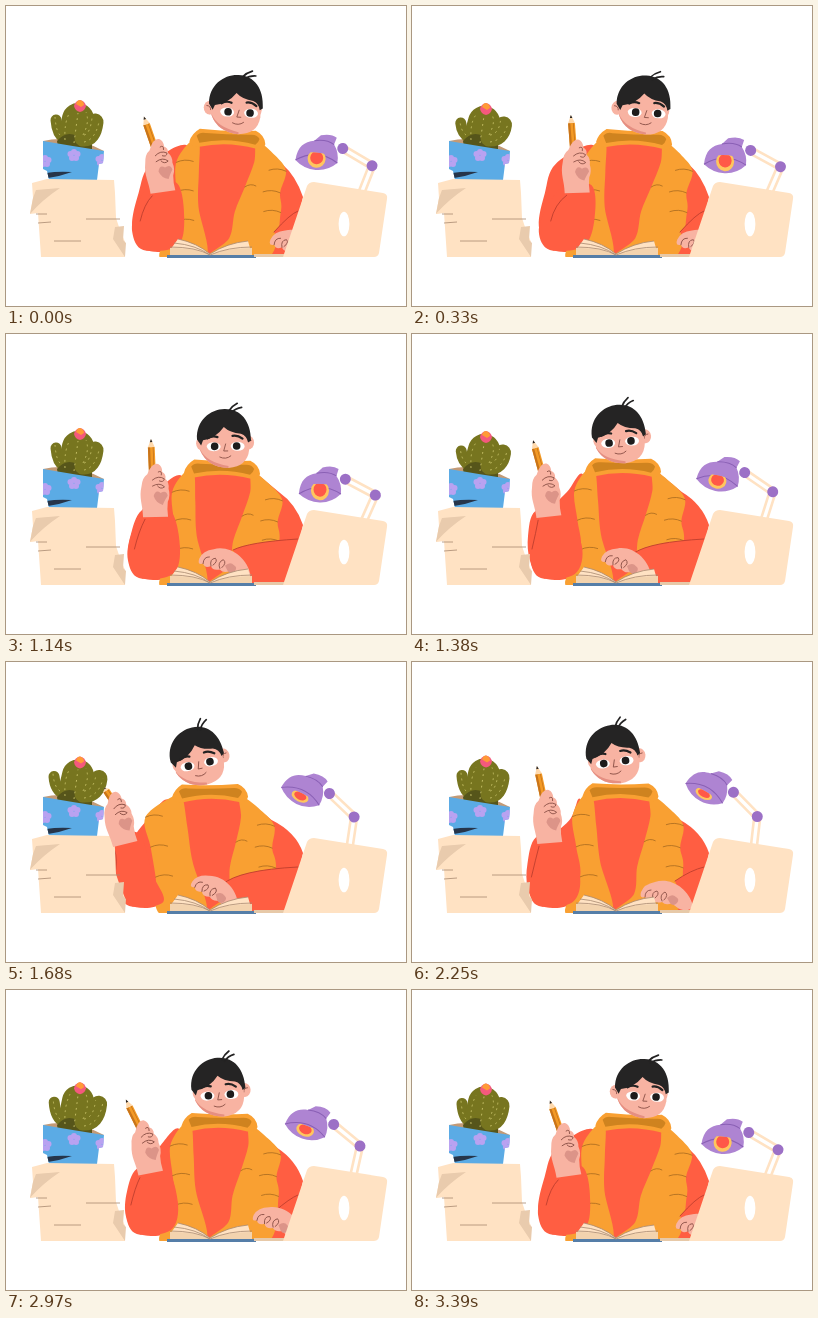
Recreate the animation shown at these times as an HTML page. Size 400 by 300 pixels, loop 3420 ms.

```html
<!DOCTYPE html>
<html lang="en">
<head>
<meta charset="utf-8">
<title>Student at a desk</title>
<style>
html, body { margin: 0; width: 100%; height: 100%; overflow: hidden; background: #fff; }
svg { display: block; width: 100vw; height: 100vh; }
.skin { fill: #f8b3a2; }
.palm { fill: #dc9488; }
.line { fill: none; stroke: #8d5248; stroke-width: .9; stroke-linecap: round; }
.ink { fill: none; stroke: #232222; stroke-linecap: round; }
.red { fill: #ff5e42; }
.vest { fill: #f9a032; }
.crease { fill: none; stroke: #a86a20; stroke-width: .8; stroke-linecap: round; }
.fold { fill: none; stroke: #bf3f2e; stroke-width: .9; stroke-linecap: round; }
.paper { fill: #ffe2c3; }
.shade { fill: #e9cbad; }
.edge { fill: none; stroke: #a98a70; stroke-width: .8; }
.rod { fill: none; stroke: #ffe2c3; stroke-width: 2.6; }
.rim { fill: none; stroke: #8a60b5; }
.stem { fill: none; stroke: #77751f; stroke-linecap: round; }
.spines { fill: none; stroke: #c9c36a; stroke-width: .9; stroke-dasharray: 1.8 4; }
</style>
</head>
<body>
<svg viewBox="0 0 400 300">
  <defs>
    <clipPath id="desk"><path d="M0 0H400V251H0Z"/></clipPath>
    <clipPath id="bulbClip"><path d="M-20 -2Q0 -8 20 -2V14H-20Z"/></clipPath>
    <clipPath id="potClip"><path d="M37 135Q66 140 98 145L97 157L93 158L91 174H43L41 165L37 163Z"/></clipPath>
    <g id="petal">
      <circle cx="-3.5" r="3"/><circle cx="3.5" r="3"/>
      <circle cx="-2" cy="4" r="3"/><circle cx="2" cy="4" r="3"/><circle cy="-2" r="3"/>
    </g>
    <circle id="joint" r="5.5" fill="#9c70c6"/>
  </defs>

  <path d="M37 135Q66 128 98 145Q70 146 37 137Z" fill="#c39a76"/>
  <path id="stemL" class="stem" stroke-width="11"/>
  <path id="stem" class="stem" stroke-width="32"/>
  <path d="M51 135Q60 124 71 130T86 130L86 145L52 141Z" fill="#56551a"/>
  <path id="stemR" class="stem" stroke-width="17"/>
  <path id="spines" class="spines"/>
  <g id="flower">
    <path d="M-6 0Q-5 -5 0 -6Q5 -5 6 0Q5 5 0 6Q-5 5 -6 0Z" fill="#f4597d"/>
    <path d="M-4 -2Q-3 -6 0 -6Q4 -5 4 -1L1 1Z" fill="#ff9a37"/>
  </g>
  <g clip-path="url(#potClip)">
    <path d="M30 130H100V178H30Z" fill="#5babe5"/>
    <path d="M40 167Q52 165 66 166Q55 170 42 172Z" fill="#26354a"/>
    <g fill="#b9a2f1">
      <use href="#petal" x="39" y="154"/><use href="#petal" x="68" y="148"/><use href="#petal" x="96" y="153"/>
    </g>
  </g>

  <g id="lowerRod">
    <path class="rod" d="M-3 0V-82M3 0V-82"/>
    <g id="upperRod">
      <path class="rod" d="M0 -3H-34M0 3H-34"/>
      <use href="#joint"/>
      <g id="lampHead">
        <g transform="translate(-25 10)">
          <path fill="#ae84d2" d="M-21 6C-20 -8 -14 -13 -4 -15L2 -21Q12 -24 18 -20L16 -13Q22 -5 21 5Q12 14 0 14Q-12 14 -21 6Z"/>
          <path class="rim" d="M-4 -15Q8 -18 16 -13M-21 6Q0 -8 21 5"/>
          <g id="bulb" clip-path="url(#bulbClip)">
            <circle cy="2" r="10" fill="#ffc65e"/><circle cy="1" r="7.2" fill="#ff5848"/>
          </g>
        </g>
        <use href="#joint"/>
      </g>
    </g>
  </g>

  <g clip-path="url(#desk)">
    <path id="torso" class="red"/>
    <path id="sleeve" class="red"/>
    <path id="panelL" class="vest"/>
    <path id="panelR" class="vest"/>
    <path id="creases" class="crease"/>
    <g id="collar">
      <path class="vest" d="M-38 5Q-36 -3 -28 -8Q0 -6 28 -8Q37 -4 38 5Q36 12 29 10Q0 3 -28 10Q-36 11 -38 5Z"/>
      <path d="M-31 -1Q-28 -5 -22 -4Q0 -3 24 -4Q30 -4 32 0Q31 4 28 6Q0 -1 -28 6Z" fill="#cf831f"/>
    </g>
  </g>

  <g id="face">
    <g id="earL"><ellipse class="skin" rx="6" ry="7"/><path class="line" d="M-3 -2Q1 -2 1 2"/></g>
    <g id="earR"><ellipse class="skin" rx="6" ry="7"/><path class="line" d="M3 -2Q-1 -2 -1 2"/></g>
    <path class="skin" d="M-24 -8L0 -20L25 -8V12Q23 29 4 30Q-17 29 -24 12Z"/>
    <path d="M-24 11Q-18 24 4 28V30Q-17 29 -24 12Z" fill="#e58f82"/>
    <path fill="#252424" d="M-27 1C-28 -18 -13 -29 1 -29C17 -29 27 -17 27 3L24 5Q23 -2 17 -4Q6 -5 0 -11Q-8 0 -21 2L-23 7Z"/>
    <path id="strand" class="ink" stroke-width="1.7" d="M-2 3Q-3 -2 -1 -8M1 3Q1 -3 5 -8"/>
    <g id="features">
      <path class="ink" stroke-width="2.2" d="M-17 0Q-12 -3 -7 -1M8 -2Q13 -3 18 1"/>
      <g id="open">
        <path fill="#fff" d="M-18 8Q-17 4 -10 4Q-4 5 -4 9Q-5 13 -11 13Q-17 13 -18 8M6 8Q7 4 14 4Q20 5 20 9Q19 13 13 13Q7 13 6 8"/>
        <g fill="#1d1c1c"><circle cx="-10" cy="8.2" r="3.8"/><circle cx="12" cy="8.2" r="3.8"/></g>
      </g>
      <g id="shut">
        <path fill="#ffd0c3" d="M-18 7Q-11 3 -4 7Q-11 12 -18 7M6 7Q13 3 20 7Q13 12 6 7"/>
        <path class="line" d="M-18 8Q-11 10 -4 8M6 8Q13 10 20 8"/>
      </g>
      <path class="line" d="M1 6L-1 13H3M-5 19Q1 22 6 18"/>
    </g>
  </g>

  <path id="forearmL" class="red"/>
  <path id="foldL" class="fold"/>
  <path class="paper" d="M26 177L41 173L108 174L109 187L110 212L113 221L119 236V251H35L32 207L24 208L27 192Z"/>
  <path class="shade" d="M30 184L54 182Q36 194 24 208L27 192ZM109 221L118 220L117 234L120 237L119 251L107 233Z"/>
  <path class="edge" d="M30 208H41M32 217L45 216M80 213H114M48 235H75"/>

  <g id="handL">
    <g id="pencil">
      <path d="M-3.4 -22H3.4V6H-3.4Z" fill="#f39a25"/>
      <path d="M-3.4 -22H-1.2V6H-3.4ZM1.4 -22H2.2V6H1.4Z" fill="#c8741a"/>
      <path d="M0 -30L3.4 -22H-3.4Z" fill="#ffd9ac"/><path d="M0 -30L1.3 -27H-1.3Z" fill="#292523"/>
    </g>
    <path class="skin" d="M-13 3C-13 -10 -17 -16 -14 -28Q-13 -37 -8 -40Q-3 -52 3 -50Q7 -48 7 -42Q11 -40 10 -35Q14 -31 13 -25Q15 -18 12 -12Q11 -5 12 3Z"/>
    <path class="palm" d="M-2 -18Q0 -25 5 -21Q11 -24 12 -18Q8 -12 7 -9Q0 -11 -2 -18Z"/>
    <path class="line" d="M-3 -34Q3 -39 9 -35Q8 -31 4 -33M-3 -28Q4 -32 9 -27Q5 -24 2 -28M3 -42Q7 -44 6 -39"/>
  </g>

  <g clip-path="url(#desk)">
    <path id="forearmR" class="red"/>
    <path id="foldR" class="fold"/>
    <g id="handR">
      <path class="skin" d="M2 9C-2 -8 -20 -20 -36 -15Q-47 -13 -50 -5Q-52 2 -46 0Q-44 5 -38 2Q-36 7 -29 5Q-25 9 -19 6C-12 14 -2 16 2 9Z"/>
      <path class="palm" d="M-24 1Q-19 -4 -15 0Q-11 2 -14 6Q-18 10 -21 6Z"/>
      <path class="line" d="M-46 0Q-46 -7 -40 -7M-38 2Q-40 -5 -34 -6Q-31 -3 -36 1M-29 4Q-32 -2 -26 -5Q-22 -2 -27 3"/>
    </g>
  </g>

  <path d="M161 249H250V252H161Z" fill="#557ea8"/>
  <path class="paper" d="M164 244L172 233Q191 237 204 248Q221 237 242 235L246 249H164Z"/>
  <path d="M164 242Q188 241 204 249Q220 242 246 242V249H164Z" fill="#f3d3ae"/>
  <path class="edge" d="M172 233Q191 237 204 248Q221 237 242 235M164 241Q190 241 204 249Q222 241 246 241M168 237Q190 239 204 249"/>
  <path d="M248 248H281V251H248Z" fill="#e7c9a8"/>
  <path class="paper" d="M277 251L301 180Q303 176 308 176L377 187Q382 188 381 193L373 247Q372 251 368 251Z"/>
  <ellipse cx="338" cy="218" rx="5.4" ry="12.3" fill="#fff"/>
</svg>
<script>
const LOOP = 3420, STEP = 30;

// Key poses; everything else on the body and lamp follows from these.
// face and hands: x, y, rotation; lamp: angle of the lower rod
const poses = [
  { t: 0,    face: [230, 98, 3],    left: [157, 183, -8],  right: [314, 242, 4],  lamp: [21.5] },
  { t: 750,  face: [234, 99, 4],    left: [178, 185, 7],   right: [316, 242, 4],  lamp: [26] },
  { t: 1140, face: [218, 104, -1],  left: [150, 180, -1],  right: [243, 232, 3],  lamp: [24] },
  { t: 1680, face: [191, 94, -12],  left: [119, 179, -14], right: [233, 238, 16], lamp: [8.5] },
  { t: 2250, face: [201, 92, -8],   left: [138, 178, -5],  right: [279, 235, 0],  lamp: [6.5] },
  { t: 2640, face: [200, 96, -9],   left: [136, 178, -13], right: [284, 235, 13], lamp: [6.5] }
];
poses.push({ ...poses[0], t: 3390 });

// Vest outlines of the upright pose, each starting at its inner top.
const vestL = [[180, 134], [184, 165], [188, 200], [200, 252], [154, 252], [168, 215], [164, 185], [160, 155], [171, 134]];
const vestR = [[238, 134], [258, 148], [271, 164], [268, 186], [271, 206], [262, 252], [203, 252], [222, 232], [225, 205], [232, 180], [238, 155]];

const el = id => document.getElementById(id);
const set = (id, name, value) => el(id).setAttribute(name, value);
const path = (id, d) => set(id, "d", d);
const place = (id, x, y, r = 0, sx = 1, sy = sx) =>
  set(id, "transform", `translate(${x} ${y}) rotate(${r}) scale(${sx} ${sy})`);
const clamp = (v, lo, hi) => Math.max(lo, Math.min(hi, v));

function poseAt(t) {
  const i = Math.max(1, poses.findIndex(p => p.t > t));
  const [a, b] = t >= LOOP - STEP ? [poses[0], poses[0]] : [poses[i - 1], poses[i]];
  const u = b.t > a.t ? (t - a.t) / (b.t - a.t) : 0;
  const k = u * u * (3 - 2 * u);
  const mix = part => a[part].map((v, j) => v + (b[part][j] - v) * k);
  return { face: mix("face"), left: mix("left"), right: mix("right"), lamp: mix("lamp")[0] };
}

// Closed Catmull-Rom curve.
function blob(p) {
  const at = i => p[(i + p.length) % p.length];
  return p.reduce((d, b, i) => {
    const a = at(i - 1), c = at(i + 1), e = at(i + 2);
    return d + `C${b.map((v, k) => v + (c[k] - a[k]) / 6)} ${c.map((v, k) => v - (e[k] - b[k]) / 6)} ${c}`;
  }, "M" + p[0]) + "Z";
}

const seam = ([x, y], dx) => `M${x} ${y}q${dx / 2} -4 ${dx} -1`;

function drawFace([x, y, r], blink) {
  const turn = clamp(r / 3, -1, 1);
  place("face", x, y, r);
  place("strand", 9, -28, 46 + 2 * r);
  place("earL", -23 - 3 * turn, 5);
  place("earR", 23 - 3 * turn, 5);
  place("features", 1 + 1.5 * turn, 0);
  set("open", "visibility", blink ? "hidden" : "visible");
  set("shut", "visibility", blink ? "visible" : "hidden");
}

function drawBody({ face, left, right }) {
  const [hx, hy, hr] = left, [rx, ry] = right;
  const cx = 204 + (face[0] - 191) * .45, cy = 131 + (face[1] - 96) * .4;
  const lean = cx - 208, drop = cy - 130;
  const pull = Math.min(0, hx - 132) * 1.35;

  // The vest shears with the collar and stays put at the desk.
  const shear = ([x, y]) => {
    const w = clamp((250 - y) / 118, 0, 1) ** 1.3;
    return [x + lean * w, y + drop * w];
  };
  const L = vestL.map(shear), R = vestR.map(shear);
  for (const i of [5, 6, 7]) L[i][0] += pull;
  place("collar", cx, cy, lean * .15);
  path("torso", `M${cx - 30} ${cy}H${cx + 28}L${268 + lean * .6} 158Q290 170 297 191L284 251H180Z`);
  path("panelL", blob(L));
  path("panelR", blob(R));
  path("creases", [5, 6, 7].map(i => seam(L[i], 17)).join("") +
    [2, 3, 4].map(i => seam(R[i], -17)).join("") + seam(R[9], 11));

  // Left arm: the elbow follows the collar, the cuff follows the hand.
  const ex = 120 + (cx - 210) * .8;
  const a = hr * Math.PI / 180, c = 14 * Math.cos(a), s = 14 * Math.sin(a);
  const cuffL = [hx - c, hy - s - 4], cuffR = [hx + c, hy + s - 4];
  const out = 158 - lean + pull * 1.2;
  path("sleeve", blob([[cx - 40, cy + 8], [out, 158], [ex + (out - ex) * .22, 187], [ex - 3, 220],
    [ex + 8, 243], [ex + 42, 240], [180, 190]]));
  const mid = [(cuffL[0] + ex) / 2 - 6, 202];
  path("forearmL", blob([cuffL, mid, [ex - 3, 226], [ex + 8, 244], [ex + 42, 240],
    [Math.max(ex + 49 + pull, cuffR[0] + 3), 212], cuffR]));
  path("foldL", `M${cuffL[0] + 3} ${cuffL[1] + 9}Q${mid[0] + 8} ${mid[1] - 4} ${mid[0] + 4} ${mid[1] + 13}`);
  place("handL", hx, hy, hr);
  place("pencil", -3, -45, 1.4 * hr, 1, clamp((hx - 110) / 22, .4, 1));

  const wx = Math.min(rx - 16, 268), wy = ry - 16;
  const top = `M${wx} ${wy}Q${wx + 16} 208 292 205`;
  path("forearmR", `${top}V249H${Math.min(rx - 4, 282)}Z`);
  path("foldR", top);
  place("handR", ...right);
}

function drawLamp(a) {
  const upper = 52 - a, tilt = 40 - 1.6 * a;
  const glow = clamp(.3 + a * .028, 0, 1);
  place("lowerRod", 336, 236, a);
  place("upperRod", 0, -82, upper - a);
  place("lampHead", -34, 0, tilt - upper);
  place("bulb", 0, 10 * (1 - glow), 0, .9, glow);
}

// Three bounces per loop; the arms spread a quarter turn behind.
function drawCactus(t) {
  const phase = t / LOOP * 6 * Math.PI;
  const bob = 3 * Math.sin(phase), spread = -Math.cos(phase);
  const fy = 100 + bob, lx = 49 - spread, ly = 114 + bob, rx = 91 + 2 * spread, ry = 116 + bob;
  place("flower", 74, fy);
  path("stem", `M68 130L72 ${fy + 13}`);
  path("stemL", `M58 132Q${lx + 1} 128 ${lx} ${ly}`);
  path("stemR", `M77 132Q${rx - 2} 133 ${rx} ${ry}`);
  path("spines", `M59 134Q58 116 64 ${fy + 6}M68 137L72 ${fy + 7}M77 129Q84 116 80 ${fy + 6}` +
    `M54 129Q${lx} 125 ${lx - 1} ${ly - 3}M78 136Q${rx} 134 ${rx + 4} ${ry}M78 129Q${rx - 5} 128 ${rx - 3} ${ry - 4}`);
}

function draw(t) {
  const pose = poseAt(t);
  const blink = [750, 2640].some(at => Math.abs(t - at) < 100);
  drawFace(pose.face, blink);
  drawBody(pose);
  drawLamp(pose.lamp);
  drawCactus(t);
}

function tick() {
  draw(Math.floor(performance.now() % LOOP / STEP) * STEP);
  requestAnimationFrame(tick);
}
tick();
</script>
</body>
</html>
```
